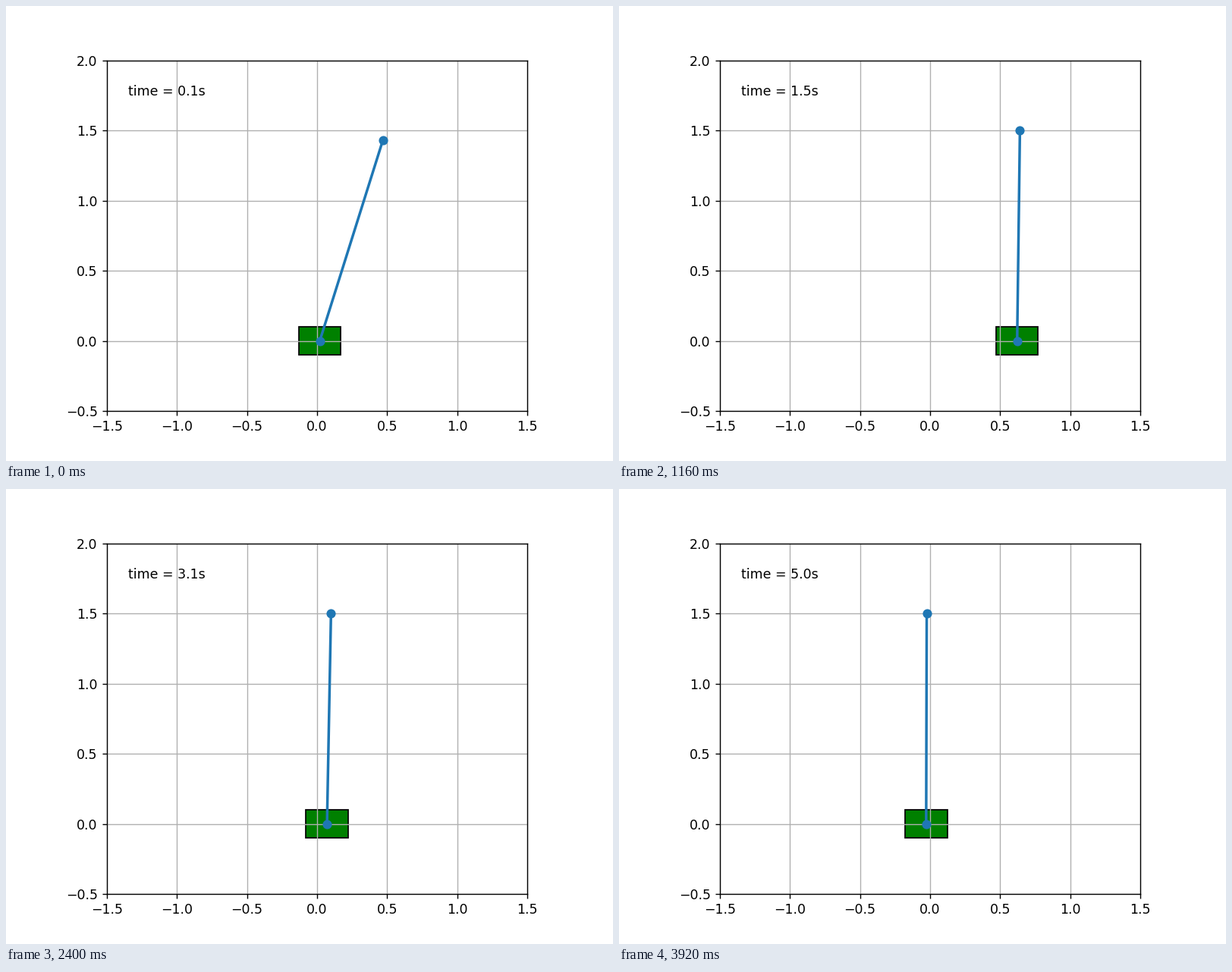
Animation of 800 by 600 pixels, one loop 3.96 s. Source, as a matplotlib script:

```python
import numpy as np
import matplotlib.pyplot as plt
from matplotlib.animation import FuncAnimation
from matplotlib.patches import Rectangle

FRAMES, INTERVAL = 99, 40
DT, SUBSTEPS = 0.05, 5
GRAVITY, ROD = 9.8, 1.5
CART_W, CART_H = 0.3, 0.2

# State: cart position, cart speed, pole angle, pole rate
START = np.array([0, 0, np.pi / 10, 0])
GAINS = np.array([3.21, 5.05, 51, 15.7])


def slope(state):
    """Time derivative of the cart and pole under state feedback."""
    _, speed, angle, rate = state
    accel = GAINS @ state
    swing = (GRAVITY * np.sin(angle) - accel * np.cos(angle)) / ROD
    return np.array([speed, accel, rate, swing])


def advance(state, h):
    """One Runge-Kutta step."""
    k1 = slope(state)
    k2 = slope(state + h / 2 * k1)
    k3 = slope(state + h / 2 * k2)
    k4 = slope(state + h * k3)
    return state + h / 6 * (k1 + 2 * k2 + 2 * k3 + k4)


def simulate():
    state, path = START, []
    for _ in range(FRAMES):
        for _ in range(SUBSTEPS):
            state = advance(state, DT / SUBSTEPS)
        path.append(state)
    return path


path = simulate()

fig = plt.figure(figsize=(6.4, 4.8), dpi=125)
ax = fig.add_subplot(111, aspect="equal", xlim=(-1.5, 1.5), ylim=(-0.5, 2))
ax.grid()

cart = ax.add_patch(Rectangle((0, -CART_H / 2), CART_W, CART_H,
                              facecolor="green", edgecolor="black", linewidth=1))
pole, = ax.plot([], [], "o-", lw=2)
clock = ax.text(0.05, 0.9, "", transform=ax.transAxes)


def update(i):
    x, _, angle, _ = path[i]
    cart.set_x(x - CART_W / 2)
    pole.set_data([x, x + ROD * np.sin(angle)], [0, ROD * np.cos(angle)])
    clock.set_text(f"time = {(i + 1) * DT:.1f}s")
    return cart, pole, clock


anim = FuncAnimation(fig, update, frames=FRAMES, interval=INTERVAL,
                     repeat=True, repeat_delay=0)
plt.show()
```
